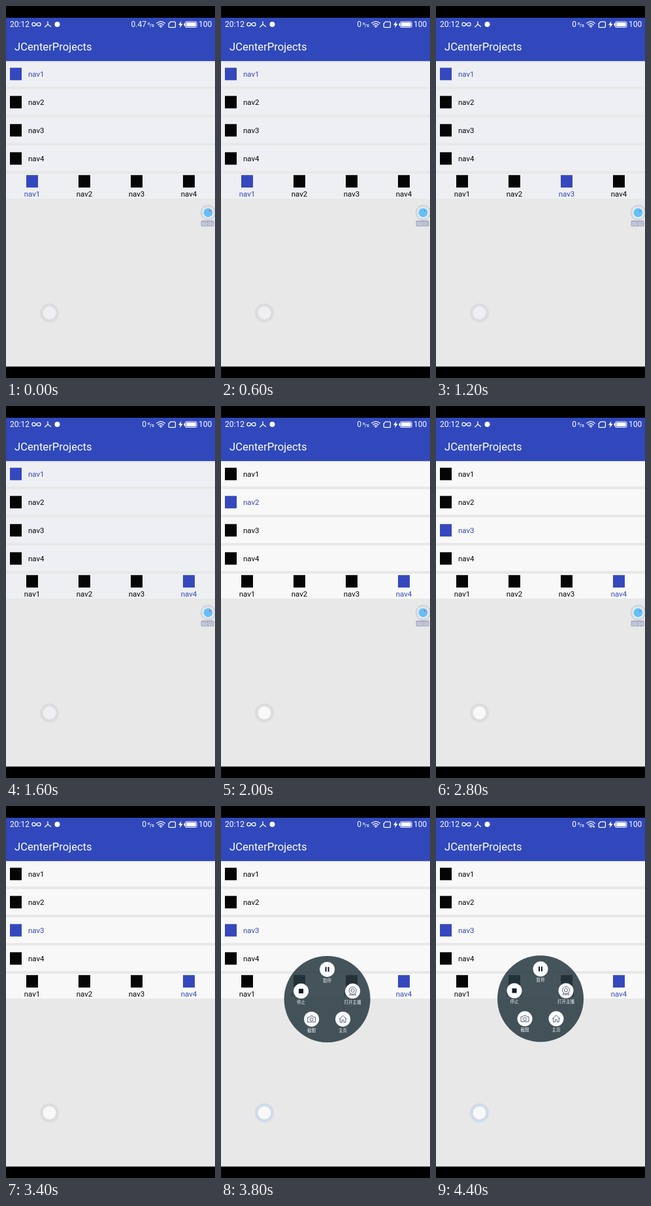
An HTML page that plays this animation: 320 by 568 pixels, repeating every 4.6 s.

```html
<!DOCTYPE html>
<html lang="en">
<head>
<meta charset="utf-8">
<style>
  html, body { margin: 0; width: 100%; height: 100%; overflow: hidden; background: #000; }
  svg { display: block; width: 320px; height: 568px; }
  text { font-family: Roboto, "Noto Sans", sans-serif; }
  .cjk text { font: 6.5px "Noto Sans CJK SC", "Noto Sans CJK", sans-serif; fill: #f4f6f8; text-anchor: middle; }
  .line { fill: none; stroke: #fff; stroke-width: 1.3; stroke-linecap: round; stroke-linejoin: round; }
  .thin { fill: none; stroke: #35405a; stroke-width: .8; stroke-linejoin: round; }
</style>
</head>
<body>
<svg viewBox="0 0 320 568">
  <defs>
    <linearGradient id="shade" x1="0" y1="0" x2="0" y2="1">
      <stop offset="0" stop-color="#00061e" stop-opacity=".14"/>
      <stop offset="1" stop-color="#00061e" stop-opacity="0"/>
    </linearGradient>
  </defs>

  <rect width="320" height="568"/>
  <rect y="18" width="320" height="532.5" fill="#e8e8e8"/>
  <g id="panels"></g>
  <rect y="18" width="320" height="66" fill="#3048bb"/>
  <rect y="84" width="320" height="2" fill="url(#shade)"/>

  <!-- status bar -->
  <g fill="#fff" font-size="12">
    <text x="6" y="32">20:12</text>
    <path class="line" d="M46.5 28C44 24.6 40 24.6 40 28S44 31.4 46.5 28 53 24.6 53 28 49 31.4 46.5 28"/>
    <path class="line" d="M64 23.8V28L59.8 32M64 28L68.6 31.6"/>
    <circle cx="78.5" cy="28" r="4"/>
    <text id="speed" x="215" y="32" text-anchor="end"></text>
    <text x="217" y="28.8" font-size="6" font-weight="500">K</text>
    <text x="220" y="32" font-size="7.5" font-weight="500">/s</text>
    <path class="line" d="M230.8 26.2Q237 21.2 243.2 26.2M232.8 28.6Q237 25.2 241.2 28.6M234.8 30.8Q237 29 239.2 30.8"/>
    <circle cx="237" cy="32.2" r="1"/>
    <path id="data" d="M239.5 30.5h4l-2 3z"/>
    <path class="line" d="M251.8 24.2H258.2Q259.4 24.2 259.4 25.4V31.4Q259.4 32.6 258.2 32.6H250.4Q249.2 32.6 249.2 31.4V26.8Z"/>
    <path d="M268.4 23L264 29H266.8L266 33.5 270.8 27.2H267.8Z"/>
    <rect x="274.5" y="24" width="17.5" height="8.5" rx="1.5" fill="none" stroke="#fff"/>
    <rect x="275.8" y="25.3" width="14.9" height="5.9"/>
    <rect x="272.6" y="26.5" width="1.6" height="3.6"/>
    <text x="295" y="32">100</text>
  </g>
  <text x="13" y="67.5" font-size="16.6" fill="#fff">JCenterProjects</text>

  <g id="items"></g>

  <!-- floating recorder button -->
  <g id="recorder">
    <circle cx="309.5" cy="315.5" r="10.8" fill="#f4f5f7" stroke="#bcc2ca" stroke-width="1.2"/>
    <circle cx="309.5" cy="315.5" r="8.6" fill="#fff" stroke="#a8b2be" stroke-width=".7"/>
    <circle cx="309.5" cy="315.5" r="7" fill="#66c0f4"/>
    <circle id="dot" cx="312" cy="312.8" r="1.6"/>
    <rect x="298.5" y="327.5" width="20" height="9" rx="1.5" fill="#a9aec6"/>
    <text id="clock" x="308.5" y="334.6" font-size="7" fill="#f4f5fa" text-anchor="middle"></text>
  </g>

  <!-- touch spot -->
  <circle id="ring" cx="66.5" cy="468.5" r="14.5"/>
  <circle id="spot" cx="66.5" cy="468.5" r="10"/>

  <g id="menu" class="cjk">
    <circle cx="160" cy="294.3" r="66" fill="#283a42" fill-opacity=".86"/>
    <g id="buttons"></g>
  </g>
</svg>

<script>
const LOOP = 4600, STEP = 200;
const BLUE = '#3548bd', BLACK = '#050505';
const $ = id => document.getElementById(id);

function add(parent, tag, attrs, text) {
  const el = document.createElementNS('http://www.w3.org/2000/svg', tag);
  for (const k in attrs) el.setAttribute(k, attrs[k]);
  if (text) el.textContent = text;
  parent.appendChild(el);
  return el;
}
const set = (id, k, v) => $(id).setAttribute(k, v);
const show = (id, on) => set(id, 'visibility', on ? 'visible' : 'hidden');

function item(n, cx, cy, tx, ty, anchor) {
  const g = add($('items'), 'g', {});
  add(g, 'rect', { x: cx - 9, y: cy - 9.5, width: 18, height: 19 });
  add(g, 'text', { x: tx, y: ty, 'font-size': 11.5, 'text-anchor': anchor }, 'nav' + n);
  return g;
}

const rows = [], tabs = [];
for (let i = 0; i < 4; i++) {
  const y = 84 + 43 * i;
  add($('panels'), 'rect', { y, width: 320, height: 39 });
  rows.push(item(i + 1, 15, y + 19.8, 34, y + 23.8, 'start'));
}
add($('panels'), 'rect', { y: 256, width: 320, height: 38 });
for (let i = 0; i < 4; i++) {
  const x = 40 + 80 * i;
  tabs.push(item(i + 1, x, 267.7, x, 290.6, 'middle'));
}

// label, centre x, centre y, glyph path, solid glyph
[
  ['暂停', 160, 248.8, 'M-3 -3.6h2v7.2h-2zM1 -3.6h2v7.2h-2z', true],
  ['停止', 120, 282, 'M-3.5 -3.5h7v7h-7z', true],
  ['打开主播', 199, 282, 'M-5.5 -.8a5.5 5.5 0 1 1 11 0a5.5 5.5 0 1 1 -11 0M-2.6 -.8a2.6 2.6 0 1 1 5.2 0a2.6 2.6 0 1 1 -5.2 0M-3.4 3.6L-5 6H5L3.4 3.6'],
  ['截图', 136, 324.8, 'M-6 -3h2.8l1.2 -1.7h4l1.2 1.7h2.8v7.5h-12zM-2.4 .6a2.4 2.4 0 1 1 4.8 0a2.4 2.4 0 1 1 -4.8 0'],
  ['主页', 184, 324.8, 'M-6 .3L0 -5.3 6 .3M-4.2 -1.2V5H-1.4V1.5H1.4V5H4.2V-1.2']
].forEach(([label, x, y, d, solid]) => {
  const g = add($('buttons'), 'g', { transform: `translate(${x} ${y})` });
  add(g, 'circle', { r: 11.5, fill: '#fbfcfd' });
  add(g, 'path', solid ? { d, fill: '#141a26' } : { d, class: 'thin' });
  add(g, 'text', { y: 19.3 }, label);
});

const pick = (list, n) => list.forEach((g, i) => g.setAttribute('fill', i === n ? BLUE : BLACK));
// number of switch times already passed
const passed = (t, times) => times.filter(s => t >= s).length;

function draw(ms) {
  const t = Math.floor((ms % LOOP) / STEP) * STEP;
  const panel = t < 2000 ? '#edeff3' : '#f8f8f8';
  const open = t >= 3800;

  $('speed').textContent = t < 400 ? '0.47' : '0';
  show('data', t >= 4400);
  set('panels', 'fill', panel);
  pick(tabs, passed(t, [800, 1200, 1400]));
  pick(rows, passed(t, [1800, 2200]));

  show('recorder', t < 3400);
  set('dot', 'fill', t % 1600 < 600 ? '#e0608a' : '#4aa8ea');
  $('clock').textContent = '00:0' + Math.floor(t / 600);

  set('ring', 'fill', open ? '#d0dbea' : '#dcdcdd');
  set('spot', 'fill', panel);

  const shift = Math.max(0, 1 - (t - 3800) / 400);
  show('menu', open);
  set('menu', 'transform', `translate(${2.6 * shift} ${0.6 * shift})`);
}

const start = performance.now();
function tick() {
  draw(performance.now() - start);
  requestAnimationFrame(tick);
}
tick();
</script>
</body>
</html>
```
